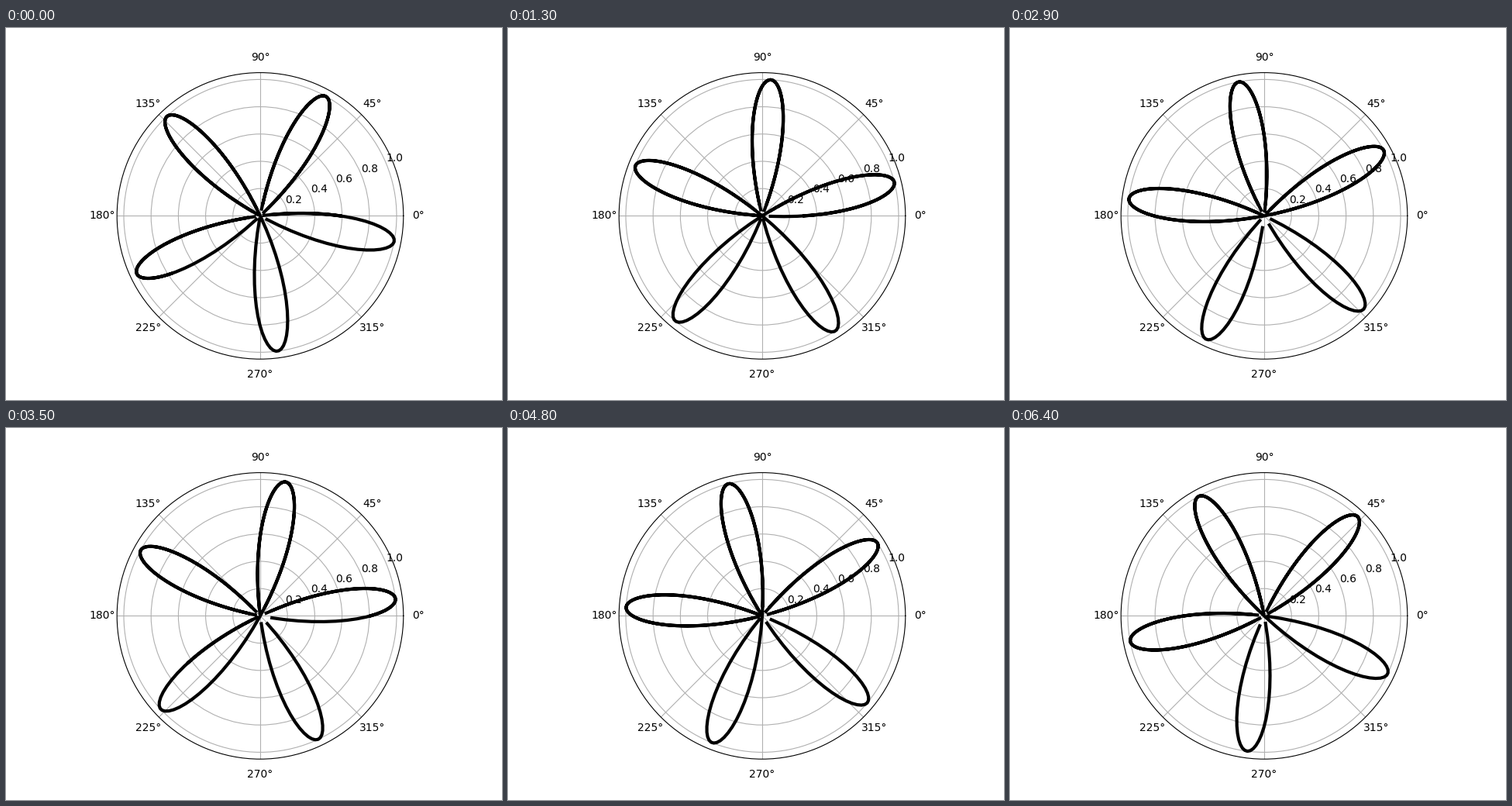
Write a matplotlib script that moves like this. It is 640x480 px and loops after 6.5 s.

```python
import numpy as np
import matplotlib.pyplot as plt
from matplotlib.animation import FuncAnimation

FRAMES = 65
INTERVAL = 100   # ms
PETALS = 5
CYCLE = 20       # frames for one full phase turn

theta = np.linspace(0, 10, 500)


def rose(i):
    """Radius of the rose curve; negative values are not drawn."""
    return np.cos(PETALS * theta + 2 * np.pi * (i + 3) / CYCLE)


fig = plt.figure(figsize=(6.4, 4.8), dpi=100)
ax = fig.add_subplot(projection="polar")
ax.set_ylim(0, 1.05)
ax.set_rticks(np.arange(1, 6) / 5)
line, = ax.plot(theta, rose(0), color="black", lw=3)
ax.set_ylim(0, 1.05)


def update(i):
    line.set_data(theta, rose(i))
    return line,


anim = FuncAnimation(fig, update, frames=FRAMES, interval=INTERVAL,
                     repeat=True, repeat_delay=0)
plt.show()
```
